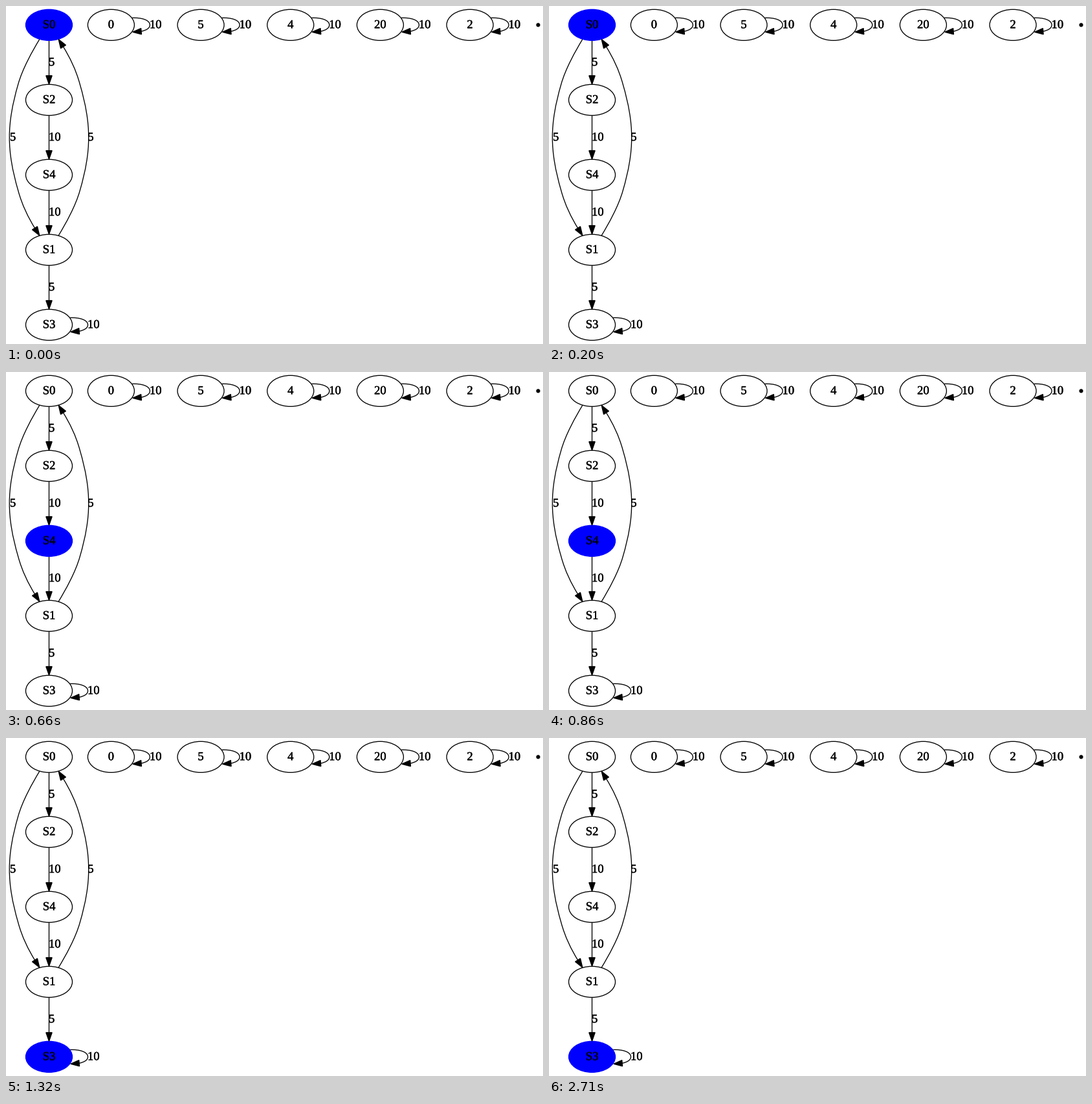
A matplotlib script that plays this animation: 830x523 px, repeating every 3630 ms.

```python
import matplotlib.pyplot as plt
import numpy as np
from matplotlib.animation import FuncAnimation
from matplotlib.patches import Ellipse, PathPatch, Polygon
from matplotlib.path import Path
from matplotlib.patheffects import withStroke

W, H, DPI = 830, 523, 100
PT = 4 / 3                      # layout points to pixels
LINE = PT * 72 / DPI
FONT = 14 * PT * 72 / DPI
RX, RY = 36, 24
STEP_MS, STEPS = 330, 11
COL, TOP, RANK = 66.5, 29.33, 116
STATES = ["S0", "S2", "S4", "S1", "S3"]
VALUES = ["0", "5", "4", "20", "2"]
INK = [withStroke(linewidth=0.3, foreground="black")]

fig = plt.figure(figsize=(W / DPI, H / DPI), dpi=DPI, facecolor="white")
ax = fig.add_axes([0, 0, 1, 1])
ax.set_xlim(0, W)
ax.set_ylim(H, 0)
ax.axis("off")


def label(x, y, text):
    ax.text(x, y + 3.7 * PT, text, ha="center", va="baseline",
            family="Liberation Serif", size=FONT, color="black",
            path_effects=INK, zorder=4)


def side_label(x, y, text):
    """Label whose left edge touches an edge line at x."""
    label(x - 0.5 + 3.5 * PT * len(text), y, text)


def node(x, y, text):
    shape = Ellipse((x, y), 2 * RX, 2 * RY, fc="white", ec="black",
                    lw=LINE, zorder=2)
    ax.add_patch(shape)
    label(x, y, text)
    return shape


def curve(points):
    codes = [Path.MOVETO] + [Path.CURVE4] * (len(points) - 1)
    ax.add_patch(PathPatch(Path(points, codes), fc="none", ec="black",
                           lw=LINE, capstyle="butt", snap=False, zorder=1))


def arrow(base, tip):
    base, tip = np.array(base, float), np.array(tip, float)
    dx, dy = (tip - base) / np.hypot(*(tip - base))
    side = 3.5 * PT * np.array([-dy, dx])
    ax.add_patch(Polygon([base + side, tip, base - side], fc="black",
                         ec="black", lw=LINE, joinstyle="miter",
                         snap=False, zorder=3))


def down_edge(y, text):
    start, tip = y + RY, y + RANK - RY - 0.2
    base = tip - 10 * PT
    curve([(COL, start), (COL, start + 18), (COL, base - 18), (COL, base)])
    arrow((COL, base), (COL, tip))
    side_label(COL, y + RANK / 2, text)


def self_loop(x, y):
    pts = [(24.4, -8.2), (34.9, -8.7), (45, -5.9), (45, 0),
           (45, 3.75), (40.9, 6.2), (35, 7.4)]
    curve([(x + PT * a, y + PT * b) for a, b in pts])
    arrow((x + PT * 35, y + PT * 7.4), (x + PT * 25, y + PT * 8.2))
    side_label(x + 45 * PT, y, "10")


def bow(side):
    """Long edge around the column: side -1 runs down, +1 runs up."""
    mid = TOP + 1.5 * RANK
    tip, base = (14.7, 151.8), (22, 140.3)
    pts = [(14.7, -151.8), (25.5, -134), (41.2, -106), (47.8, -82),
           (65.7, -20), (65.7, 20), (47.8, 82),
           (41.6, 105), (32, 124), base]

    def place(p):
        return COL + side * p[0], mid - side * p[1]

    curve([place(p) for p in pts])
    arrow(place(base), place(tip))
    return mid


nodes = [node(COL, TOP + RANK * i, s) for i, s in enumerate(STATES)]
for i, text in enumerate(["5", "10", "10", "5"]):
    down_edge(TOP + RANK * i, text)
for side, x in [(-1, 6.5), (1, 126.8)]:
    side_label(x, bow(side), "5")
self_loop(COL, TOP + RANK * 4)

for i, text in enumerate(VALUES):
    x = 162.4 + 104 * PT * i
    node(x, TOP, text)
    self_loop(x, TOP)
ax.add_patch(Ellipse((822.5, TOP), 4.8, 4.8, fc="black", ec="black", lw=LINE))


def update(i):
    active = min(i, len(nodes) - 1)
    for k, shape in enumerate(nodes):
        shape.set_facecolor("blue" if k == active else "white")
        shape.set_edgecolor("blue" if k == active else "black")
    return nodes


anim = FuncAnimation(fig, update, frames=STEPS, interval=STEP_MS,
                     init_func=lambda: update(0), repeat=True,
                     repeat_delay=0, blit=False)
plt.show()
```
